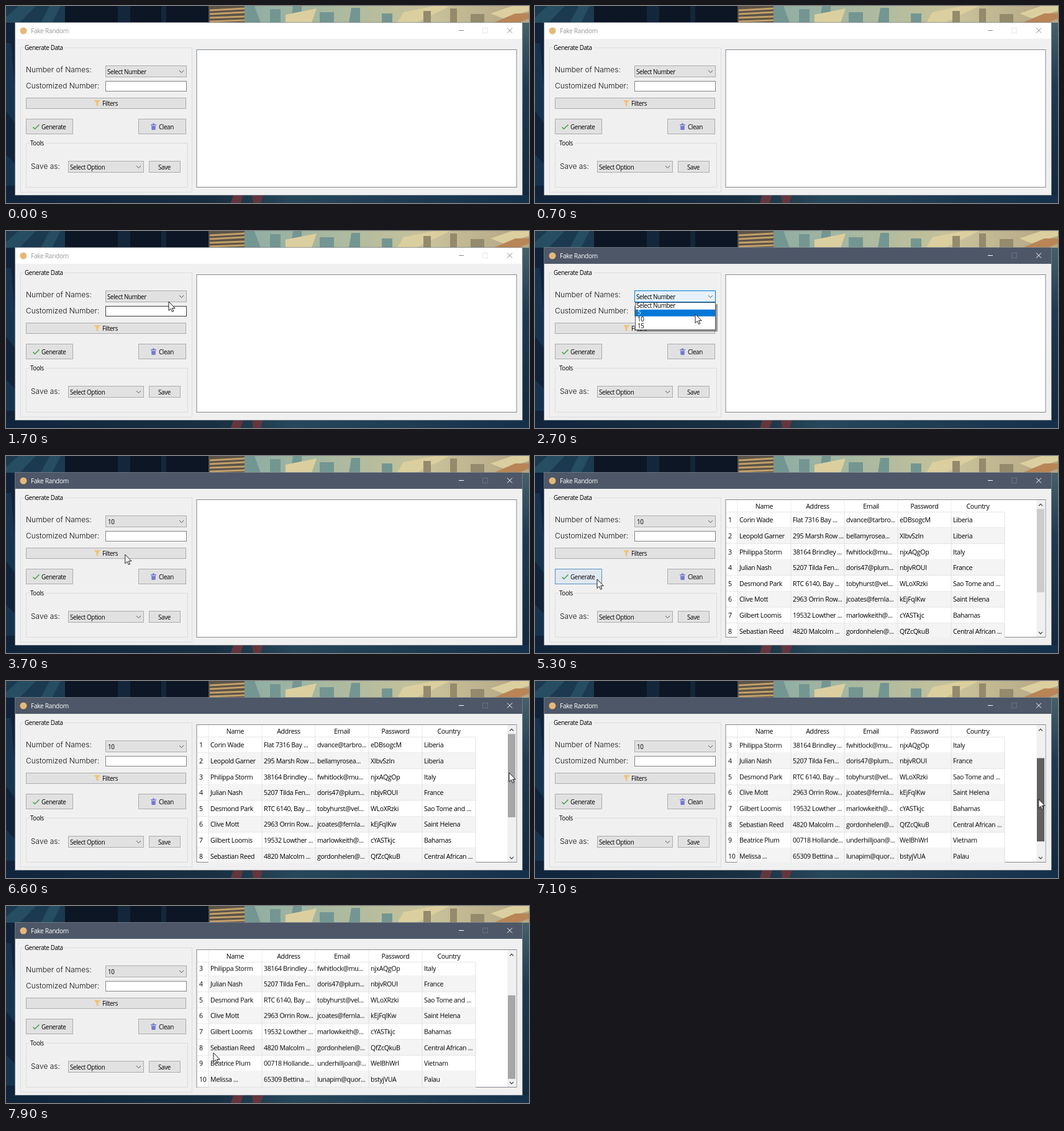
Recreate the animation shown at these times as an HTML page. Size 842 px wide and 318 px high, loop 8000 ms.

```html
<!DOCTYPE html>
<html lang="en">
<head>
<meta charset="utf-8">
<title>Fake Random</title>
<style>
html, body { margin: 0; width: 100%; height: 100%; overflow: hidden; background: #10233a; }
svg { display: block; width: 842px; height: 318px; }
text { font: 9.9px "Open Sans", sans-serif; letter-spacing: -.4px; fill: #000; white-space: pre; }
.label { font: 300 12px Inter, sans-serif; letter-spacing: 0; fill: #111; }
.title { font-size: 10.2px; letter-spacing: -.32px; }
#table text { font-size: 10.6px; letter-spacing: -.32px; }
.mid { text-anchor: middle; }
.box { fill: #e1e1e1; stroke: #adadad; }
.group { fill: none; stroke: #dcdcdc; }
.hot { fill: #e5f1fb; stroke: #0078d7; }
.chevron { fill: none; stroke: #555; }
.pick rect { fill: #0078d7; }
.pick text { fill: #fff; }

.anim { animation: 8s step-end infinite; }
#active { animation-name: active; }
#menu, #comboHot { animation-name: menu; }
#pick0 { animation-name: pick0; }
#pick1 { animation-name: pick1; }
#pick2 { animation-name: pick2; }
#before { animation-name: before; }
#after { animation-name: after; }
#field { animation-name: field; }
#generate { animation-name: generate; }
#table { animation-name: table; }
#rows { animation-name: rows; }
#thumb { animation-name: thumb; }
#cursor { animation-name: cursor; }

@keyframes active { 0% { opacity: 0 } 25%, 100% { opacity: 1 } }
@keyframes menu { 0% { opacity: 0 } 26.25% { opacity: 1 } 40%, 100% { opacity: 0 } }
@keyframes pick0 { 0% { opacity: 1 } 32.5%, 100% { opacity: 0 } }
@keyframes pick1 { 0% { opacity: 0 } 32.5% { opacity: 1 } 35%, 100% { opacity: 0 } }
@keyframes pick2 { 0% { opacity: 0 } 35%, 100% { opacity: 1 } }
@keyframes before { 0% { opacity: 1 } 40%, 100% { opacity: 0 } }
@keyframes after { 0% { opacity: 0 } 40%, 100% { opacity: 1 } }
@keyframes field { 0% { stroke: #858585 } 20% { stroke: #3c3c3c } 26.25%, 100% { stroke: #858585 } }
@keyframes generate {
  0% { fill: #e1e1e1; stroke: #adadad }
  51.25% { fill: #e5f1fb; stroke: #0078d7 }
  56.25% { fill: #cce4f7; stroke: #005499 }
  57.5% { fill: #e0e8f0; stroke: #5a8fc6 }
  70%, 100% { fill: #e1e1e1; stroke: #adadad }
}
@keyframes table { 0% { opacity: 0 } 57.5%, 100% { opacity: 1 } }
@keyframes rows {
  0% { transform: translateY(0) }
  85% { transform: translateY(-25.65px) }
  87.5% { transform: translateY(-51.3px) }
  90%, 100% { transform: translateY(-54.3px) }
}
@keyframes thumb {
  0% { transform: translateY(0); fill: #cdcdcd }
  81.25% { transform: translateY(0); fill: #a6a6a6 }
  83.75% { transform: translateY(0); fill: #606060 }
  85% { transform: translateY(19.5px); fill: #606060 }
  87.5% { transform: translateY(39px); fill: #606060 }
  90% { transform: translateY(58.5px); fill: #606060 }
  91.25%, 100% { transform: translateY(58.5px); fill: #a6a6a6 }
}
@keyframes cursor {
  0% { transform: translate(640px, 330px) }
  12.5% { transform: translate(640px, 318px); animation-timing-function: steps(4) }
  17.5% { transform: translate(360px, 165px); animation-timing-function: steps(4) }
  21.25% { transform: translate(262px, 114px) }
  25% { transform: translate(262px, 109px) }
  28.75% { transform: translate(262px, 110px); animation-timing-function: steps(4) }
  33.75% { transform: translate(258px, 134px) }
  35% { transform: translate(256px, 140px) }
  36.25% { transform: translate(254px, 144px) }
  42.5% { transform: translate(254px, 144px); animation-timing-function: steps(8) }
  52.5% { transform: translate(88px, 184px) }
  55% { transform: translate(83px, 187px) }
  60% { transform: translate(83px, 187px); animation-timing-function: steps(5) }
  66.25% { transform: translate(100px, 199px) }
  68.75% { transform: translate(100px, 199px); animation-timing-function: steps(10) }
  81.25% { transform: translate(810px, 148px) }
  83.75% { transform: translate(810px, 148px); animation-timing-function: steps(6) }
  91.25% { transform: translate(811px, 212px) }
  92.5% { transform: translate(790px, 214px); animation-timing-function: steps(5) }
  98.75%, 100% { transform: translate(334px, 237px) }
}
</style>
</head>
<body>
<svg viewBox="0 0 842 318" xmlns="http://www.w3.org/2000/svg">
  <defs>
    <linearGradient id="sky">
      <stop offset="0" stop-color="#8fada3"/>
      <stop offset=".3" stop-color="#a9b9a0"/>
      <stop offset=".65" stop-color="#c9c29a"/>
      <stop offset="1" stop-color="#b3a584"/>
    </linearGradient>
    <linearGradient id="edge" x2="0" y2="1">
      <stop offset="0" stop-color="#45616a"/>
      <stop offset=".35" stop-color="#1d3a52"/>
      <stop offset="1" stop-color="#13273d"/>
    </linearGradient>
    <linearGradient id="ground">
      <stop offset="0" stop-color="#10253c"/>
      <stop offset=".4" stop-color="#182f42"/>
      <stop offset=".55" stop-color="#27475a"/>
      <stop offset="1" stop-color="#15304a"/>
    </linearGradient>
    <clipPath id="view"><rect x="308" y="90.5" width="499" height="202"/></clipPath>
    <path id="chev" class="chevron" d="M-3.5 -2L0 1.6L3.5 -2"/>
  </defs>

  <!-- wallpaper -->
  <rect width="842" height="318" fill="#10233a"/>
  <path d="M0 0H95V27H0Z" fill="#1b3a50"/>
  <path d="M20 0H48L22 27H0V18ZM70 0H88L74 27H56Z" fill="#264d62"/>
  <path d="M0 60H8L15 140V190L0 170ZM0 240L15 255V290H0Z" fill="#163450"/>
  <path d="M95 0H326V27H95Z" fill="#0c1624"/>
  <path d="M180 0H200V27H180ZM250 0H258V27H250Z" fill="#14263a"/>
  <path d="M326 0H384V27H326Z" fill="#5c5347"/>
  <path d="M328 7L384 4M328 13L384 10M328 19L384 17M328 25L384 23" stroke="#c2a06a" stroke-width="3"/>
  <path d="M384 0H842V27H384Z" fill="url(#sky)"/>
  <path d="M384 0H400L410 27H384ZM425 5H442V27H425ZM462 0H476V27H458ZM505 10H528V27H505ZM556 3H570V27H552ZM605 12H622V27H605Z" fill="#749692"/>
  <path d="M450 14L500 4L492 27H450ZM640 10L690 0H715L660 27H630ZM780 12L815 0H842V8L800 20Z" fill="#dccf9f"/>
  <path d="M672 8H684V27H672ZM715 4H726V27H715ZM748 13H770V27H748Z" fill="#948a6c"/>
  <path d="M785 27L820 12H842V20L825 27Z" fill="#b98556"/>
  <path d="M831 27H842V318H831Z" fill="url(#edge)"/>
  <path d="M0 305H842V318H0Z" fill="url(#ground)"/>
  <path d="M366 305H382L378 318H362ZM396 305H414L410 318H398Z" fill="#64353c"/>

  <!-- window -->
  <rect x="14.5" y="26.5" width="817" height="279" fill="#f0f0f0" stroke="#59636d" stroke-opacity=".6"/>
  <rect x="15" y="27" width="816" height="26" fill="#fff"/>
  <text class="title" x="40" y="44" style="fill:#999">Fake Random</text>
  <g fill="none" stroke="#888">
    <path d="M729 39.500H737M807 35.500L815 43.500M815 35.500L807 43.500"/>
    <rect x="767.5" y="35.500" width="8" height="8" stroke="#e8e8e8"/>
  </g>
  <g id="active" class="anim">
    <rect x="15" y="27" width="816" height="26" fill="#4d5767"/>
    <text class="title" x="40" y="44" style="fill:#fff">Fake Random</text>
    <g fill="none" stroke="#fff">
      <path d="M729 39.500H737M807 35.500L815 43.500M815 35.500L807 43.500"/>
      <rect x="767.5" y="35.500" width="8" height="8" stroke="#697282"/>
    </g>
  </g>
  <circle cx="28" cy="40" r="5.500" fill="#e5b878"/>

  <!-- form -->
  <path class="group" d="M28 67.500H23.500V300.500H299.500V67.500H95"/>
  <text x="30" y="71">Generate Data</text>
  <path class="group" d="M37 221.500H32.500V292.500H292.500V221.500H64"/>
  <text x="39" y="225">Tools</text>
  <text class="label" x="32" y="107">Number of Names:</text>
  <text class="label" x="32" y="132.500">Customized Number:</text>
  <text class="label" x="40" y="263">Save as:</text>

  <rect class="box" x="160.500" y="96.500" width="130" height="18"/>
  <rect id="comboHot" class="hot anim" x="160.500" y="96.500" width="130" height="18"/>
  <text id="before" class="anim" x="163" y="109.500">Select Number</text>
  <text id="after" class="anim" x="164" y="109.500">10</text>
  <use href="#chev" x="282.500" y="106"/>
  <rect id="field" class="anim" x="160.500" y="121.500" width="130" height="16" fill="#fff"/>

  <rect class="box" x="32.500" y="148.500" width="257" height="17"/>
  <path d="M142 152H152L148.500 156.500V162L145.500 160.500V156.500Z" fill="#f2c274"/>
  <text x="155" y="160.500">Filters</text>

  <rect id="generate" class="anim" x="32.500" y="182.500" width="75" height="24"/>
  <path d="M43.500 195.500L46.500 198.500L53.500 191.500" fill="none" stroke="#43a047" stroke-width="1.5"/>
  <text x="57" y="198.500">Generate</text>

  <rect class="box" x="213.500" y="182.500" width="76" height="24"/>
  <path d="M233 191H242V192.500H233ZM236 189.500H239V191H236ZM234 193.500H241L240.500 200H234.500Z" fill="#7479d2"/>
  <text x="246" y="198.500">Clean</text>

  <rect class="box" x="100.500" y="250.500" width="121" height="18"/>
  <text x="103" y="263.500">Select Option</text>
  <use href="#chev" x="213.500" y="260"/>
  <rect class="box" x="230.500" y="250.500" width="50" height="18"/>
  <text class="mid" x="255" y="263.500">Save</text>

  <!-- results -->
  <rect x="307" y="70.500" width="515" height="222" fill="#fff" stroke="#828790"/>
  <g id="table" class="anim">
    <g clip-path="url(#view)"><g id="rows" class="anim"></g></g>
    <g id="head"></g>
    <rect x="807.500" y="71" width="14" height="221" fill="#f0f0f0"/>
    <rect id="thumb" class="anim" x="808" y="85.500" width="12" height="134.500"/>
    <path d="M811 80.500L814 77.500L817 80.500M811 284L814 287L817 284" fill="none" stroke="#505050" stroke-width="1.3"/>
  </g>

  <!-- drop-down list -->
  <g id="menu" class="anim">
    <path d="M164 161H292.500V118" fill="none" stroke="#000" stroke-opacity=".35" stroke-width="3"/>
    <rect x="161.500" y="115.500" width="129" height="44" fill="#fff" stroke="#555"/>
    <g id="items"></g>
  </g>

  <path id="cursor" class="anim" d="M0 0V14.500L3.400 11.400L5.600 16.400L7.800 15.400L5.700 10.600H10.200Z" fill="#fff" stroke="#000" stroke-width=".9"/>
</svg>
<script>
const $ = id => document.getElementById(id);
const text = (x, y, s, cls = '') => `<text class="${cls}" x="${x}" y="${y}">${s}</text>`;
const rect = (x, y, w, h, fill) => `<rect x="${x}" y="${y}" width="${w}" height="${h}" fill="${fill}"/>`;

const people = `Corin Wade|Flat 7316 Bay ...|dvance@tarbro...|eDBsogcM|Liberia
Leopold Garner|295 Marsh Row ...|bellamyrosea...|XIbvSzIn|Liberia
Philippa Storm|38164 Brindley ...|fwhitlock@mu...|njxAQgOp|Italy
Julian Nash|5207 Tilda Fen...|doris47@plum...|nbjvROUI|France
Desmond Park|RTC 6140, Bay ...|tobyhurst@vel...|WLoXRzki|Sao Tome and ...
Clive Mott|2963 Orrin Row...|jcoates@fernla...|kEjFqIKw|Saint Helena
Gilbert Loomis|19532 Lowther ...|marlowkeith@...|cYASTkjc|Bahamas
Sebastian Reed|4820 Malcolm ...|gordonhelen@...|QfZcQkuB|Central African ...
Beatrice Plum|00718 Hollande...|underhilljoan@...|WelBhWrl|Vietnam
Melissa ...|65309 Bettina ...|lunapim@quor...|bstyjVUA|Palau`.split('\n').map(row => row.split('|'));

const left = 326, top0 = 90.5, colW = 86, rowH = 25.65, line = '#e2e2e2';
const colX = i => left + i * colW;

$('rows').innerHTML = people.map((cells, r) => {
  const y = top0 + r * rowH, base = y + 16.7;
  return (r % 2 ? rect(left, y, 5 * colW, rowH, '#f4f4f4') : '')
    + rect(308, y + rowH - .8, 5 * colW + 18, .8, line)
    + text(311, base, r + 1)
    + cells.map((s, i) => text(colX(i) + 3, base, s)).join('');
}).join('') + [0, 1, 2, 3, 4, 5].map(i => rect(colX(i) - .5, top0, 1, rowH * 10, line)).join('');

$('head').innerHTML = rect(308, 71, 499, 19.5, '#fff')
  + rect(308, 90, 448, .8, line)
  + ['Name', 'Address', 'Email', 'Password', 'Country'].map((s, i) =>
      text(colX(i) + colW / 2, 85, s, 'mid') + rect(colX(i) - .5, 71, 1, 19, '#ececec')).join('');

const options = ['Select Number', '5', '10', '15'];
const option = (s, i) => text(i ? 165 : 163, 124 + i * 11.1, s);
$('items').innerHTML = options.map(option).join('')
  + options.slice(0, 3).map((s, i) =>
      `<g id="pick${i}" class="pick anim">${rect(162, 115.7 + i * 11.1, 128, 11, '')}${option(s, i)}</g>`).join('');
</script>
</body>
</html>
```
